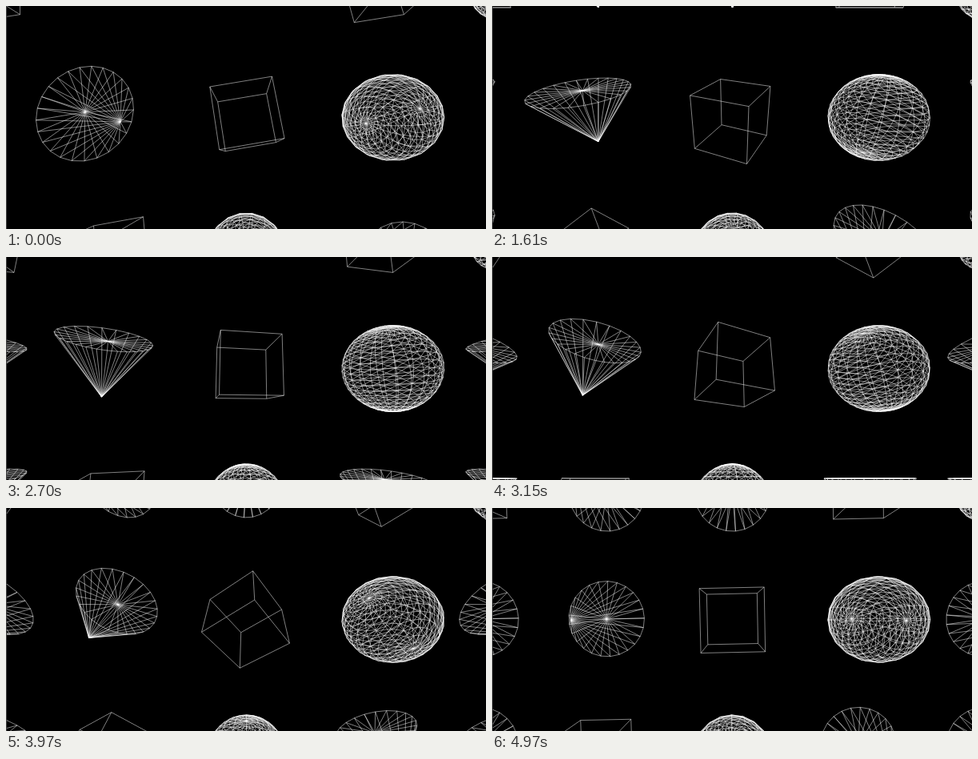
Write an HTML page with a canvas that moves like this. It is 600 by 279 pixels and loops after 5000 ms.

```html
<!DOCTYPE html>
<html lang="en">
<head>
<meta charset="utf-8">
<title>Wireframe solids</title>
<style>
  html, body { margin: 0; width: 100%; height: 100%; overflow: hidden; background: #000; }
  canvas { display: block; width: 600px; height: 279px; }
</style>
</head>
<body>
<canvas id="stage" width="600" height="279"></canvas>
<script>
const ctx = document.getElementById('stage').getContext('2d');
const W = 600, H = 279, CX = 300.5, CY = 139.5;
const LOOP = 5000;
const DIST = 80, FOCAL = 283;          // camera distance, focal length in px
const GAP = 50, RADIUS = 15, SIZE = 20;

// A solid is a list of points and a list of index pairs.
function makeCube() {
  const s = SIZE / 2, points = [], edges = [];
  for (let i = 0; i < 8; i++) {
    points.push([i & 1 ? s : -s, i & 2 ? s : -s, i & 4 ? s : -s]);
    for (const bit of [1, 2, 4]) if (!(i & bit)) edges.push([i, i | bit]);
  }
  return { points, edges };
}

function makeCone(n) {
  const h = SIZE / 2, points = [[0, h, 0], [0, -h, 0]], edges = [];
  for (let i = 0; i < n; i++) {
    const a = i / n * Math.PI * 2;
    points.push([RADIUS * Math.sin(a), -h, RADIUS * Math.cos(a)]);
    edges.push([0, i + 2], [1, i + 2], [i + 2, (i + 1) % n + 2]);
  }
  return { points, edges };
}

function makeSphere(cols, rows) {
  const points = [], edges = [];
  const id = (r, c) => r * cols + c % cols;
  for (let r = 0; r <= rows; r++) {
    const v = r / rows * Math.PI;
    for (let c = 0; c < cols; c++) {
      const u = c / cols * Math.PI * 2;
      points.push([-RADIUS * Math.cos(u) * Math.sin(v), RADIUS * Math.cos(v), RADIUS * Math.sin(u) * Math.sin(v)]);
      if (r > 0 && r < rows) edges.push([id(r, c), id(r, c + 1)]);
      if (r < rows) edges.push([id(r, c), id(r + 1, c)]);
      if (r > 0 && r < rows - 1) edges.push([id(r, c), id(r + 1, c + 1)]);
    }
  }
  return { points, edges };
}

const cube = makeCube(), cone = makeCone(25), sphere = makeSphere(20, 20);

// Rows from top to bottom, columns from -2 to 2.
const grid = [
  [cube, cone, cone, cube, sphere],
  [cone, cone, cube, sphere, cone],
  [cone, cube, sphere, cone, cone]
];

// Time in ms and angle in degrees, used for both the x and the y turn.
const turn = [[0, 260.2], [180, 254], [1090, 224.4], [2090, 189], [2700, 168.8],
              [3580, 138.8], [4330, 113], [4970, 91.2]];

function angleAt(t) {
  let i = 1;
  while (i < turn.length - 1 && t > turn[i][0]) i++;
  const [t0, a0] = turn[i - 1], [t1, a1] = turn[i];
  return (a0 + (a1 - a0) * (t - t0) / (t1 - t0)) * Math.PI / 180;
}

// The motion runs in short steps with two pauses.
function stepTime(t) {
  if (t < 60) return 0;
  if (t < 1090) return Math.min(180, Math.floor(t / 30) * 30);
  if (t >= 4970) return 4970;
  const step = 3760 / 123;
  return Math.min(4850, 1090 + Math.floor((t - 1090) / step + 0.01) * step);
}

// Each edge gets its own stroke, so crossing lines add up.
function drawSolid(solid, x0, y0, cos, sin) {
  const spots = solid.points.map(([x, y, z]) => {
    const zx = z * cos - x * sin;
    const px = x * cos + z * sin + x0;
    const py = y * cos - zx * sin + y0;
    const k = FOCAL / (DIST - (y * sin + zx * cos));
    return [CX + px * k, CY - py * k];
  });
  for (const [a, b] of solid.edges) {
    ctx.beginPath();
    ctx.moveTo(...spots[a]);
    ctx.lineTo(...spots[b]);
    ctx.stroke();
  }
}

function draw(time) {
  const a = angleAt(time), cos = Math.cos(a), sin = Math.sin(a);
  ctx.fillStyle = '#000';
  ctx.fillRect(0, 0, W, H);
  ctx.strokeStyle = '#fff';
  ctx.lineWidth = 0.5;
  grid.forEach((row, r) => row.forEach((solid, c) =>
    drawSolid(solid, (c - 2) * GAP, (1 - r) * GAP, cos, sin)));
  ctx.fillStyle = '#444';
  ctx.fillRect(0, 0, 1, H);
}

const start = performance.now();
let shown = -1;
function tick() {
  const time = stepTime((performance.now() - start) % LOOP);
  if (time !== shown) draw(shown = time);
  requestAnimationFrame(tick);
}
tick();
</script>
</body>
</html>
```
